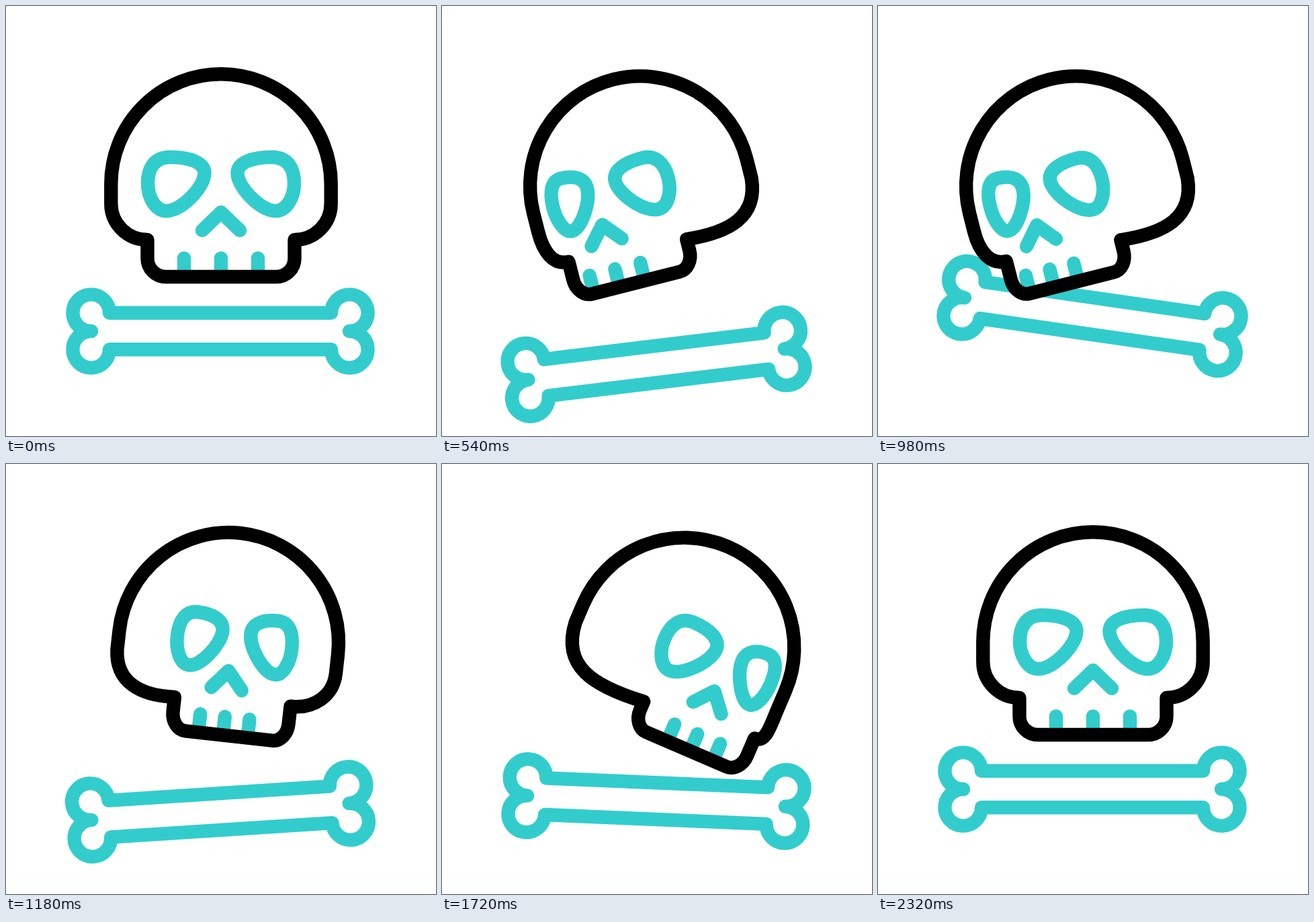
Animation of 640 by 640 pixels, one loop 2400 ms. Source, as an HTML page with a canvas:

```html
<!DOCTYPE html>
<html lang="en">
<head>
<meta charset="utf-8">
<title>Skull and bone</title>
<style>
html, body { margin: 0; width: 100%; height: 100%; overflow: hidden; background: #fff; }
canvas { display: block; width: 640px; height: 640px; }
</style>
</head>
<body>
<canvas id="stage" width="640" height="640"></canvas>
<script>
const ctx = document.getElementById('stage').getContext('2d');
const LOOP = 2400, TEAL = '#33cccc', BLACK = '#000';
const HEAD_RADIUS = 163.7, NOTCH = 109.5;

const bonePath = new Path2D('M-165-27.3A27.3 27.3 0 1 0-192 0A27.3 27.3 0 1 0-165 27.3' +
  'H165A27.3 27.3 0 1 0 192 0A27.3 27.3 0 1 0 165-27.3Z');

// Turning points of the bouncing bone
const bounces = [
  { at: 435, drop: 54.6, angle: -8 },
  { at: 830, drop: -28.4, angle: 9.4 },
  { at: 1350, drop: 42, angle: -5.5 },
  { at: 1520, drop: -14, angle: -1.2 },
  { at: 1690, drop: 17.7, angle: 2.4 },
  { at: 2170, drop: 0, angle: 0 },
];

function ease(t, from, to) {
  const x = Math.min(1, Math.max(0, (t - from) / (to - from)));
  return x < 0.5 ? (2 * x) ** 3.3 / 2 : 1 - (2 - 2 * x) ** 3.3 / 2;
}

function boneAt(t) {
  let drop = 0, angle = 0, from = 0;
  for (const b of bounces) {
    const f = ease(t, from, b.at);
    drop += (b.drop - drop) * f;
    angle += (b.angle - angle) * f;
    from = b.at;
  }
  return { drop, angle };
}

function place(x, y, degrees, draw) {
  ctx.save();
  ctx.translate(x, y);
  ctx.rotate(degrees * Math.PI / 180);
  draw();
  ctx.restore();
}

function stroke(color, path) {
  ctx.strokeStyle = color;
  ctx.stroke(path);
}

// Half of the jaw, as distances from the middle; the cheek swells as the notch moves inward
function jawSide(notch, turned) {
  const fold = Math.max(0, NOTCH - notch), out = Math.max(0, notch - NOTCH);
  const chin = notch - 27.5 + 6 * turned;
  return {
    notch, chin,
    corner: chin + 0.55 * (notch - chin),
    notchY: -20 + 0.17 * fold,
    upperX: HEAD_RADIUS - 0.08 * fold,
    upperY: -44 + 0.45 * fold,
    lowerX: 139.5 - 0.43 * fold + 0.7 * out,
    lowerY: -20 + 0.27 * fold,
  };
}

function headPath(l, r) {
  const p = new Path2D();
  p.moveTo(-l.notch, l.notchY);
  p.lineTo(-l.notch, 8);
  p.bezierCurveTo(-l.notch, 23, -l.corner, 35, -l.chin, 35);
  p.lineTo(r.chin, 35);
  p.bezierCurveTo(r.corner, 35, r.notch, 23, r.notch, 8);
  p.lineTo(r.notch, r.notchY);
  p.bezierCurveTo(r.lowerX, r.lowerY, r.upperX, r.upperY, HEAD_RADIUS, -74);
  p.arc(0, -103, HEAD_RADIUS, 0, Math.PI, true);
  p.lineTo(-HEAD_RADIUS, -74);
  p.bezierCurveTo(-l.upperX, l.upperY, -l.lowerX, l.lowerY, -l.notch, l.notchY);
  p.closePath();
  return p;
}

function eyePath(outer, inner) {
  const p = new Path2D(), x = u => outer + (inner - outer) * u;
  p.moveTo(x(0.39), -143);
  p.bezierCurveTo(x(0.745), -143, x(1), -135, x(1), -119);
  p.bezierCurveTo(x(1), -99, x(0.6), -63, x(0.33), -63);
  p.bezierCurveTo(x(0.13), -63, x(0), -84, x(0), -104);
  p.bezierCurveTo(x(0), -128, x(0.13), -143, x(0.39), -143);
  p.closePath();
  return p;
}

// left and right: how far the skull has turned to each side, 0 to 1
function drawSkull(left, right) {
  const turned = left + right;
  const feature = (shrink, toLeft, toRight) => x =>
    x * (1 - shrink * turned) - toLeft * left + toRight * right;
  const jaw = feature(0.21, 47, 63), eye = feature(0.2, 57, 60);
  const nose = feature(0.19, 78, 67), tooth = feature(0.33, 75.5, 69);

  const head = headPath(jawSide(-jaw(-NOTCH), turned), jawSide(jaw(NOTCH), turned));
  ctx.fillStyle = '#fff';
  ctx.fill(head);
  for (const x of [-55, 0, 55]) stroke(TEAL, new Path2D(`M${tooth(x)} 7.5V30`));
  stroke(BLACK, head);

  for (const side of [-1, 1]) {
    const [far, near] = side < 0 ? [left, right] : [right, left];
    const middle = eye(side * 66.75);
    const half = side * 42.25 * (1 - 0.38 * far - 0.09 * near);
    stroke(TEAL, eyePath(middle + half, middle - half));
  }
  stroke(TEAL, new Path2D(`M${nose(-28)}-34L${nose(0)}-61L${nose(28)}-34`));
}

function render() {
  const t = performance.now() % LOOP;
  const bone = boneAt(t);
  const across = ease(t, 800, 1530);
  const left = ease(t, 0, 800) - across;
  const right = across - ease(t, 1640, 2320);

  ctx.fillStyle = '#fff';
  ctx.fillRect(0, 0, 640, 640);
  ctx.lineWidth = 20.4;
  ctx.lineCap = ctx.lineJoin = 'round';
  place(319, 484 + bone.drop, bone.angle, () => stroke(TEAL, bonePath));
  place(320, 368, 23.3 * right - 16.1 * left, () => drawSkull(left, right));
  requestAnimationFrame(render);
}
render();
</script>
</body>
</html>
```
